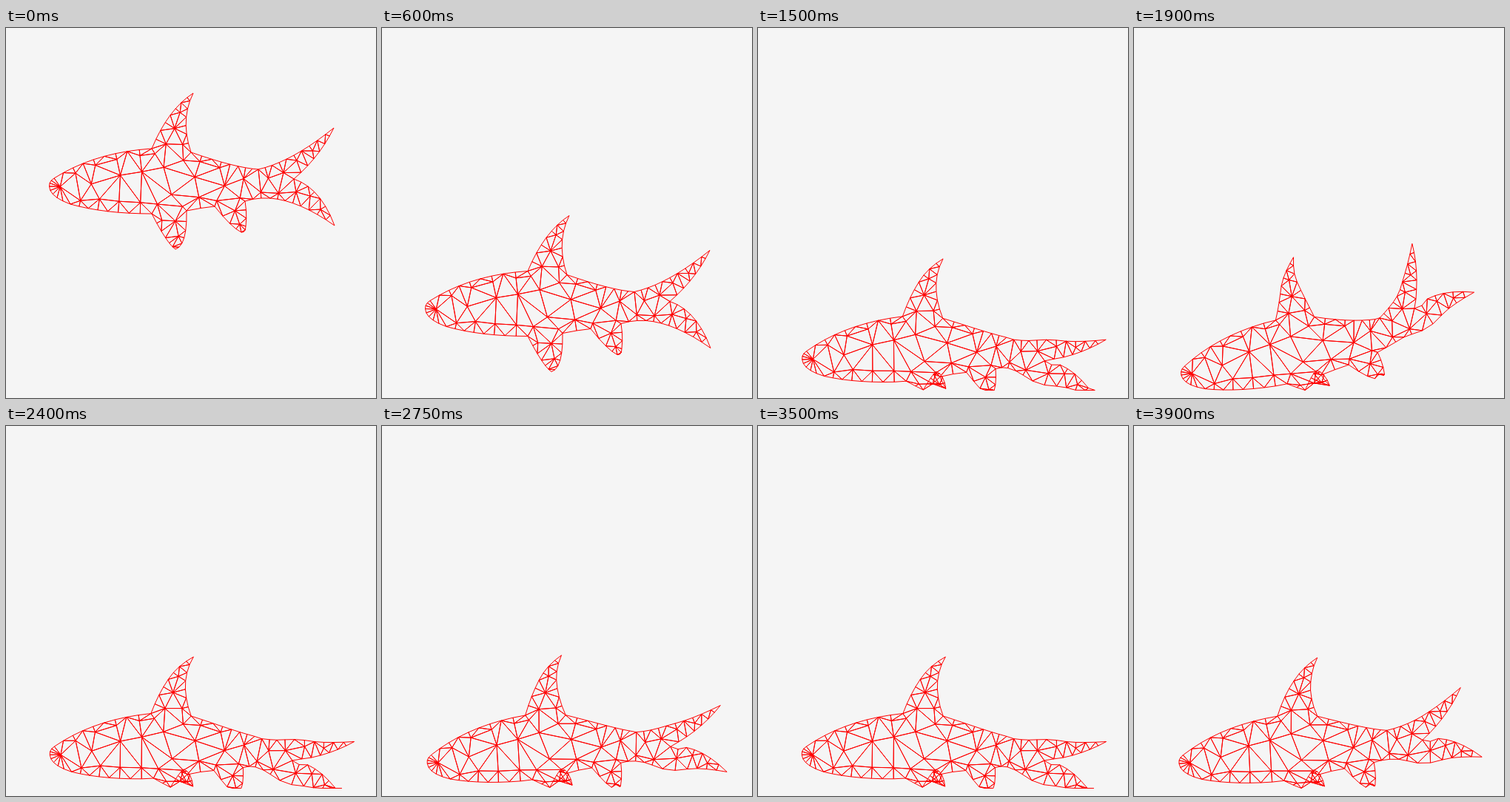
Animation of 500 by 500 pixels, one loop 3.95 s. Source, as an HTML page with a canvas:

```html
<!DOCTYPE html>
<html lang="en">
<head>
<meta charset="utf-8">
<title>Falling mesh fish</title>
<style>
html, body { margin: 0; width: 100%; height: 100%; overflow: hidden; background: #f5f5f5; }
canvas { display: block; width: 500px; height: 500px; }
</style>
</head>
<body>
<canvas id="stage" width="500" height="500"></canvas>
<script>
const ctx = document.getElementById('stage').getContext('2d');
const LOOP = 3950, STEP = 50, FLOOR = 489.5, IMPACT = 650;
const CENTRE = [197, 207], DORSAL = [223.5, 165.5], NOTCH = [389, 204];

const ramp = (v, from, to) => Math.max(0, Math.min(1, (v - from) / (to - from)));
const smooth = (v, from, to) => { const s = ramp(v, from, to); return s * s * (3 - 2 * s); };
const gap = (a, b) => Math.hypot(a[0] - b[0], a[1] - b[1]);
function rotate([x, y], [px, py], degrees) {
  const a = degrees * Math.PI / 180, c = Math.cos(a), s = Math.sin(a);
  return [px + (x - px) * c - (y - py) * s, py + (x - px) * s + (y - py) * c];
}

// Outline: quadratic curves as [control x, control y, end x, end y, subdivisions].
const NOSE = [58.5, 214];
const curves = [
  [58, 207, 65, 203, 3], [120, 168, 197, 163, 9],
  [219, 110, 253, 88, 8], [235, 124, 250, 168, 7],
  [310, 189, 341, 191, 8], [386, 181, 443, 135, 10],
  [424, 174, ...NOTCH, 7], [425, 216, 444, 267, 7],
  [396, 233, 357, 230, 8], [338, 229, 323, 234, 3],
  [326, 252, 324, 268, 3], [324, 277, 318, 276, 3], [305, 270, 282, 241, 4],
  [263, 243, 244, 247, 2], [245, 294, 229, 299, 6], [218, 292, 197, 251, 6],
  [133, 251, 87, 238, 8], [59, 228, ...NOSE, 5]
];

function traceOutline() {
  const points = [];
  let [x0, y0] = NOSE;
  for (const [cx, cy, x, y, n] of curves) {
    for (let i = 1; i <= n; i++) {
      const t = i / n, a = (1 - t) ** 2, b = 2 * t * (1 - t), c = t * t;
      points.push([a * x0 + b * cx + c * x, a * y0 + b * cy + c * y]);
    }
    [x0, y0] = [x, y];
  }
  return points;
}

function inside([x, y], polygon) {
  let hit = false;
  polygon.forEach(([ax, ay], i) => {
    const [bx, by] = polygon[(i + 1) % polygon.length];
    if ((ay > y) !== (by > y) && x < ax + (bx - ax) * (y - ay) / (by - ay)) hit = !hit;
  });
  return hit;
}

function edgeDistance(p, polygon) {
  return Math.min(...polygon.map((a, i) => {
    const b = polygon[(i + 1) % polygon.length], dx = b[0] - a[0], dy = b[1] - a[1];
    const s = ramp((p[0] - a[0]) * dx + (p[1] - a[1]) * dy, 0, dx * dx + dy * dy);
    return gap(p, [a[0] + s * dx, a[1] + s * dy]);
  }));
}

// Inner vertices: the outline pushed inwards, deepest layer first, thinned out by spacing.
function fillInside(polygon) {
  const points = [], n = polygon.length;
  for (const depth of [30, 15, 8]) {
    polygon.forEach(([x, y], i) => {
      const a = polygon[(i + n - 1) % n], b = polygon[(i + 1) % n], length = gap(a, b);
      const p = [x - (b[1] - a[1]) / length * depth, y + (b[0] - a[0]) / length * depth];
      const free = points.every(q => gap(p, q) > 14 + depth / 2);
      if (free && inside(p, polygon) && edgeDistance(p, polygon) > depth * 0.85) points.push(p);
    });
  }
  return points;
}

function circumcircle(tri, pts) {
  const [[ax, ay], [bx, by], [cx, cy]] = tri.map(i => pts[i]);
  const ux = bx - ax, uy = by - ay, vx = cx - ax, vy = cy - ay;
  const d = 2 * (ux * vy - uy * vx) || 1e-9, u = ux * ux + uy * uy, v = vx * vx + vy * vy;
  const x = (vy * u - uy * v) / d, y = (ux * v - vx * u) / d;
  return { tri, x: ax + x, y: ay + y, r: x * x + y * y };
}

// Incremental Delaunay triangulation, trimmed to the outline.
function triangulate(points, polygon) {
  const n = points.length;
  const pts = [...points, [-9000, -9000], [9500, -9000], [250, 14000]];
  let cells = [circumcircle([n, n + 1, n + 2], pts)];
  points.forEach(([x, y], p) => {
    const edges = new Map();
    cells = cells.filter(({ tri, x: cx, y: cy, r }) => {
      if ((x - cx) ** 2 + (y - cy) ** 2 >= r) return true;
      tri.forEach((a, i) => {
        const b = tri[(i + 1) % 3], key = Math.min(a, b) + '-' + Math.max(a, b);
        if (!edges.delete(key)) edges.set(key, [a, b]);
      });
      return false;
    });
    for (const [a, b] of edges.values()) cells.push(circumcircle([a, b, p], pts));
  });
  const middle = tri => [0, 1].map(k => tri.reduce((sum, i) => sum + pts[i][k], 0) / 3);
  return cells.map(c => c.tri).filter(tri => Math.max(...tri) < n && inside(middle(tri), polygon));
}

const outline = traceOutline();
const vertices = [...outline, ...fillInside(outline)];
const triangles = triangulate(vertices, outline);

// Poses: drop in pixels, then degrees: body pitch, stem and tail direction,
// upper lobe relative to the tail, dorsal fin relative to the body.
const falling = t => [0.9194 * ((t / STEP) ** 2 + 3 * t / STEP), 0, 0, 0, 0, 0];
const reared = [194.5, 17, 9, -18, 11, 6];
const dived = [231, -10, -15, -31, -9, -12];
const sagged = [225.5, -2, 6, 21, 14, 0];
const tilted = [230, -10, -3, -8, -6, -5];
const settled = [229, -5.5, -1, 0, -2, 2];
const keys = [
  [600, falling(600)], [IMPACT, falling(IMPACT)], [820, sagged], [1100, reared],
  [1470, sagged], [1900, dived], [2400, sagged], [3100, tilted], [3500, sagged], [3900, settled]
];

// Smooth curve through the poses, with matching speed on both sides of each key.
function poseAt(t) {
  if (t <= IMPACT) return falling(t);
  let k = 1;
  while (k < keys.length - 2 && keys[k + 1][0] < t) k++;
  const before = keys[k - 1], from = keys[k], to = keys[k + 1], after = keys[k + 2] || to;
  const span = to[0] - from[0], s = Math.min(1, (t - from[0]) / span);
  return from[1].map((a, i) => {
    const slope = (p, q) => (q[1][i] - p[1][i]) / (q[0] - p[0]) * span;
    return a + s * s * (3 - 2 * s) * (to[1][i] - a)
      + s * (1 - s) ** 2 * slope(before, to) - s * s * (1 - s) * slope(from, after);
  });
}

// The lower fins fold up into themselves once they meet the floor.
function crumple([x, y], amount) {
  const fold = (base, pivot, squash) => {
    const d = y - base;
    return amount * (base + (d < pivot ? d * squash : pivot * squash - (d - pivot)) - y);
  };
  if (x > 196 && x < 250 && y > 250) return [x + amount * 10 * ramp(y, 250, 275), y + fold(250, 25, 0.55)];
  if (x > 280 && x < 328 && y > 241) return [x, y + fold(241, 30, 0.9)];
  return [x, y];
}

function flexFins(point, upper, lower, dorsal) {
  const [x, y] = point;
  if (x > 196 && x < 256 && y < DORSAL[1]) return rotate(point, DORSAL, dorsal * ramp(y, DORSAL[1], 115));
  const rise = y - NOTCH[1];
  const weight = smooth(x, 360, 405) * ramp(Math.abs(rise), 0, 10);
  return rotate(point, NOTCH, weight * (rise < 0 ? upper : lower));
}

// Bends the body along a spine that runs from the centre to the tail.
function bendAlong(drop, pitch, stem, tail) {
  const joints = [];
  let p = [CENTRE[0] + 0.2 * Math.abs(pitch), CENTRE[1] + drop];
  for (let x = CENTRE[0]; x < 500; x++) {
    const angle = pitch + (stem - pitch) * ramp(x, 230, 322) + (tail - stem) * smooth(x, 322, 350);
    joints.push([p, angle]);
    p = rotate([p[0] + 1, p[1]], p, angle);
  }
  return ([x, y]) => {
    const i = Math.max(0, Math.min(joints.length - 1, Math.floor(x - CENTRE[0])));
    const [joint, angle] = joints[i];
    return rotate([joint[0] + x - CENTRE[0] - i, joint[1] + y - CENTRE[1]], joint, angle);
  };
}

function draw(t) {
  const [drop, pitch, stem, tail, upper, dorsal] = poseAt(t);
  const amount = ramp(t, IMPACT, IMPACT + 150);
  const bend = bendAlong(drop, pitch, stem, tail);
  const placed = vertices.map(v => {
    const [x, y] = bend(flexFins(crumple(v, amount), upper, -33 * amount, dorsal));
    return [x, Math.min(y, FLOOR)];
  });
  ctx.fillStyle = '#f5f5f5';
  ctx.fillRect(0, 0, 500, 500);
  ctx.strokeStyle = '#f00';
  ctx.lineWidth = 1;
  for (const tri of triangles) {
    ctx.beginPath();
    tri.forEach(i => ctx.lineTo(...placed[i]));
    ctx.closePath();
    ctx.stroke();
  }
}

const start = performance.now();
function tick() {
  const t = (performance.now() - start) % LOOP;
  draw(Math.floor(t / STEP) * STEP);
  requestAnimationFrame(tick);
}
tick();
</script>
</body>
</html>
```
